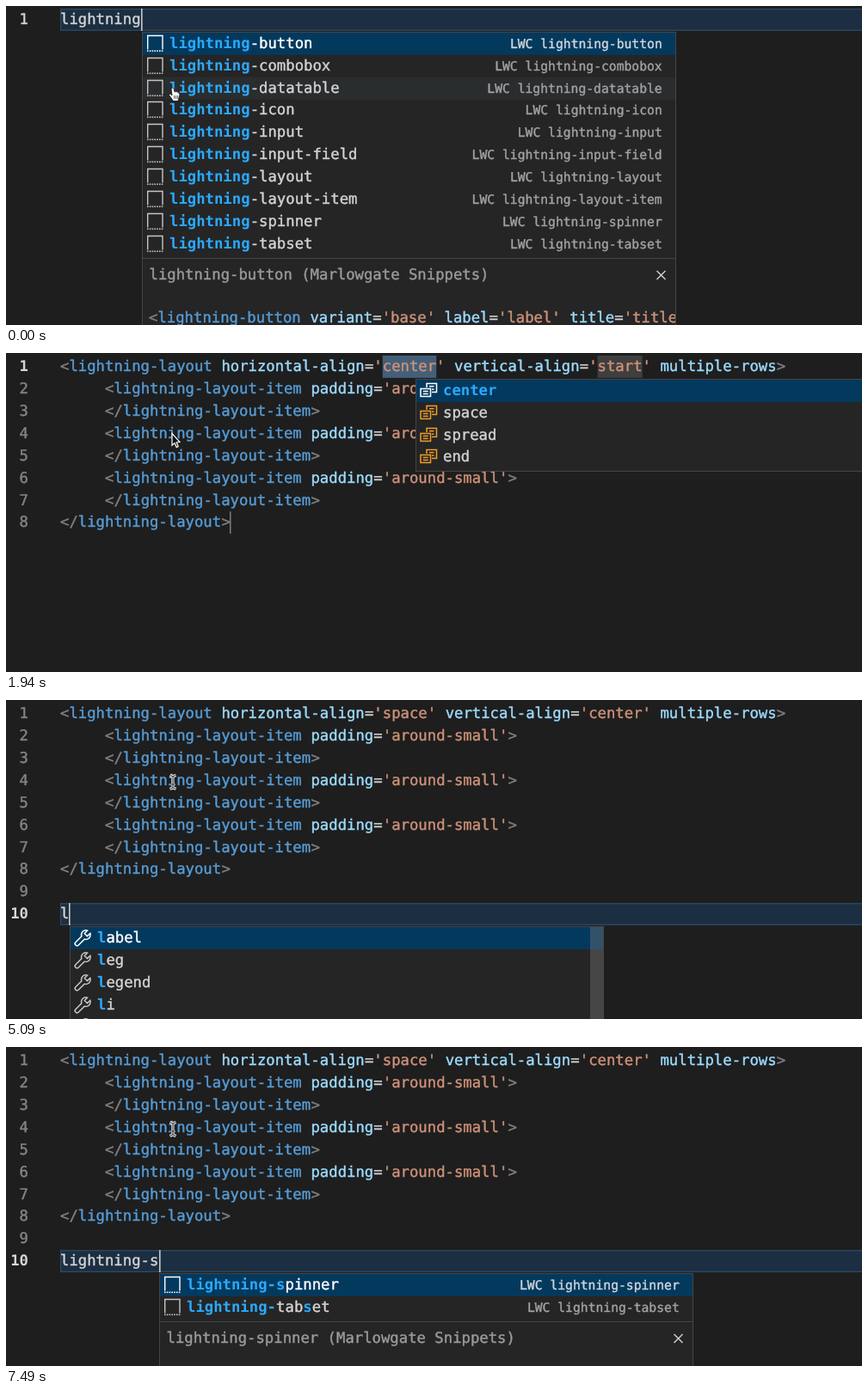
Animation of 995 by 371 pixels, one loop 8000 ms. Source, as an HTML page with a canvas:

```html
<!DOCTYPE html>
<html lang="en">
<head>
<meta charset="utf-8">
<title>Snippet completion</title>
<style>
html, body { margin: 0; width: 100%; height: 100%; overflow: hidden; background: #1e1e1e; }
canvas { display: block; width: 995px; height: 371px; }
</style>
</head>
<body>
<canvas id="stage"></canvas>
<script>
const W = 995, H = 371, LOOP = 8000;
const LEFT = 63, TOP = 3, ROW = 25.9, SIZE = 17.28, ADV = 10.41;
const MENU_W = 621, MENU_PAD = 3.6;
const C = {
  bg: '#1e1e1e', panel: '#252526', edge: '#454545', text: '#d4d4d4', picked: '#04395e',
  hover: '#2a2d2e', match: '#2aaaff', tag: '#569cd6', bracket: '#808080', attr: '#9cdcfe',
  string: '#ce9178', dim: '#858585', orange: '#ee9d28', line: '#1c2e42', lineEdge: '#2d4a63'
};

const canvas = document.getElementById('stage');
const ctx = canvas.getContext('2d');
const dpr = window.devicePixelRatio || 1;
canvas.width = W * dpr;
canvas.height = H * dpr;
ctx.scale(dpr, dpr);
ctx.textRendering = 'geometricPrecision';

const component = name => ({ label: 'lightning-' + name, detail: 'LWC lightning-' + name, icon: snippetIcon });
const components = ['button', 'combobox', 'datatable', 'icon', 'input', 'input-field',
  'layout', 'layout-item', 'spinner', 'tabset'].map(component);
const keyword = label => ({ label, icon: wrenchIcon });
const choice = label => ({ label, icon: enumIcon });
const alignX = ['center', 'space', 'spread', 'end'].map(choice);
const alignY = ['start', 'center', 'end', 'stretch'].map(choice);

// Each step changes part of the state from its time on.
const steps = [
  [0, { typed: 'lightning', line: 0, caret: true, mouse: handCursor, field: -1, pick: 0, sash: 0 }],
  [150, { typed: 'lightning-' }],
  [450, { typed: 'lightning-l' }],
  [600, { typed: 'lightning-la', mouse: arrowCursor }],
  [750, { typed: 'lightning-lay', mouse: resizeCursor }],
  [1040, { sash: 0.5 }],
  [1190, { sash: 1, caret: false }],
  [1340, { typed: '', inserted: true, h: 'center', v: 'start', field: 0, sash: 0, caret: true, mouse: arrowCursor }],
  [1490, { choices: alignX }],
  [1940, { caret: false }],
  [2240, { pick: 1 }],
  [2390, { caret: true }],
  [2690, { h: 'space', field: 1, choices: alignY, pick: 0 }],
  [3290, { pick: 1, caret: false }],
  [3590, { v: 'center', field: -1, choices: null, pick: 0, line: 7, caret: true, mouse: beamCursor }],
  [4190, { caret: false }],
  [4640, { line: 8, caret: true }],
  [4790, { line: 9 }],
  [5090, { typed: 'l' }],
  [5240, { typed: 'li' }],
  [5540, { typed: 'lig' }],
  [5690, { typed: 'ligh' }],
  [6290, { caret: false }],
  [6440, { typed: 'lightn', caret: true }],
  [6740, { typed: 'lightni' }],
  [6890, { typed: 'lightnin' }],
  [7040, { typed: 'lightning' }],
  [7340, { typed: 'lightning-' }],
  [7490, { typed: 'lightning-s' }]
];

const stateAt = t => Object.assign({}, ...steps.filter(s => s[0] <= t).map(s => s[1]));

function layoutCode(h, v, indent) {
  const pad = ' '.repeat(indent);
  const item = [pad + "<lightning-layout-item padding='around-small'>", pad + '</lightning-layout-item>'];
  return [`<lightning-layout horizontal-align='${h}' vertical-align='${v}' multiple-rows>`,
    ...item, ...item, ...item, '</lightning-layout>'];
}

function docCode(label) {
  if (label === 'lightning-layout') return layoutCode('center', 'start', 4);
  return ["<lightning-button variant='base' label='label' title='title'>", '</lightning-button>'];
}

function rect(x, y, w, h, color) {
  ctx.fillStyle = color;
  ctx.fillRect(x, y, w, h);
}

// Regular text gets a hairline outline for a slightly heavier weight.
function text(str, x, mid, color, bold = false, size = SIZE) {
  const base = Math.floor(mid) + 6;
  ctx.font = `${bold ? 'bold ' : ''}${size}px "DejaVu Sans Mono", monospace`;
  ctx.fillStyle = color;
  ctx.fillText(str, x, base);
  if (!bold) {
    ctx.strokeStyle = color;
    ctx.lineWidth = 0.4;
    ctx.strokeText(str, x, base);
  }
  return x + str.length * ADV * size / SIZE;
}

function textRight(str, right, mid, color, bold, size = SIZE) {
  text(str, right - str.length * ADV * size / SIZE, mid, color, bold, size);
}

function code(str, x, mid) {
  let prev = '';
  for (const m of str.matchAll(/<\/?|>|=|'[^']*'|[\w-]+/g)) {
    const s = m[0];
    const color = /^[<>]/.test(s) ? C.bracket : s === '=' ? C.text : s[0] === "'" ? C.string
      : prev[0] === '<' ? C.tag : C.attr;
    text(s, x + m.index * ADV, mid, color);
    prev = s;
  }
}

const lineTop = i => TOP + i * ROW;
const lineMid = i => lineTop(i) + 12.65;
const colX = n => LEFT + n * ADV;

// Positions in label that match the query in order, or null.
function matchSpots(label, query) {
  const spots = [];
  let from = 0;
  for (const ch of query) {
    const i = label.indexOf(ch, from);
    if (i < 0) return null;
    spots.push(i);
    from = i + 1;
  }
  return spots;
}

function suggestions(typed) {
  if (typed === 'l') return ['label', 'leg', 'legend', 'li', 'link'].map(keyword);
  if (typed === 'li') return ['li', 'link'].map(keyword).concat(components);
  const last = item => matchSpots(item.label, typed).at(-1);
  return components.filter(c => matchSpots(c.label, typed)).sort((a, b) => last(a) - last(b));
}

function stroke(color, width, draw) {
  ctx.strokeStyle = color;
  ctx.lineWidth = width;
  ctx.beginPath();
  draw();
  ctx.stroke();
}

function poly(points, close) {
  points.forEach(([x, y], i) => i ? ctx.lineTo(x, y) : ctx.moveTo(x, y));
  if (close) ctx.closePath();
}

function snippetIcon(x, mid, picked) {
  const color = picked ? '#fff' : '#c5c5c5', y = mid - 8.5;
  stroke(color, 1.4, () => poly([[x + 0.7, y + 16], [x + 0.7, y], [x + 18, y], [x + 18, y + 16]]));
  for (let i = 0; i < 7; i++) rect(x + i * 2.8, y + 17, 1.6, 1.6, color);
}

function enumIcon(x, mid, picked) {
  const color = picked ? '#fff' : C.orange;
  stroke(color, 1.5, () => {
    poly([[x + 7, mid - 3], [x + 7, mid - 7.5], [x + 18.5, mid - 7.5], [x + 18.5, mid + 2.5], [x + 13, mid + 2.5]]);
    ctx.rect(x, mid - 1.5, 11.5, 9);
    poly([[x + 10, mid - 4.2], [x + 15.5, mid - 4.2]]);
    poly([[x + 13, mid - 0.8], [x + 15.5, mid - 0.8]]);
    poly([[x + 2.8, mid + 1.6], [x + 8.7, mid + 1.6]]);
    poly([[x + 2.8, mid + 4.6], [x + 8.7, mid + 4.6]]);
  });
}

function wrenchIcon(x, mid, picked) {
  ctx.save();
  ctx.translate(x + 9, mid + 1);
  ctx.rotate(-Math.PI / 4);
  stroke(picked ? '#fff' : '#c5c5c5', 1.5, () => {
    ctx.arc(-9, 0, 2.4, Math.PI / 2, -Math.PI / 2);
    ctx.arc(5.5, 0, 5.3, -2.67, -0.45);
    ctx.lineTo(5.5, -2.2);
    ctx.lineTo(5.5, 2.2);
    ctx.arc(5.5, 0, 5.3, 0.45, 2.67);
    ctx.closePath();
  });
  ctx.restore();
}

function drawLabel(item, query, x, mid, picked) {
  const spots = matchSpots(item.label, query) || [];
  const runs = [];
  [...item.label].forEach((ch, i) => {
    const hit = spots.includes(i);
    const run = runs.at(-1);
    if (run && run.hit === hit) run.s += ch;
    else runs.push({ s: ch, hit });
  });
  for (const { s, hit } of runs) x = text(s, x, mid, hit ? C.match : picked ? '#fff' : C.text, hit);
}

function drawMenu(items, query, x, line, pick, hover, width) {
  const top = lineTop(line) + 27, y = Math.round(top);
  const rows = Math.min(items.length, 12);
  const bottom = Math.round(top + rows * ROW + MENU_PAD);
  rect(x, y, width, bottom - y + 1, C.edge);
  rect(x + 1, y + 1, width - 2, bottom - y - 1, C.panel);
  items.slice(0, rows).forEach((item, i) => {
    const picked = i === pick, mid = Math.floor(lineMid(line) + 27.6 + i * ROW);
    if (picked || i === hover) rect(x + 1, y + 1 + i * ROW, width - 2, ROW, picked ? C.picked : C.hover);
    item.icon(x + 6, mid, picked);
    drawLabel(item, query, x + 32, mid, picked);
    if (item.detail) textRight(item.detail, x + 605, mid, picked ? '#cfd6dc' : '#a2a2a2', false, 14.7);
  });
  if (query.length && query.length < 3) rect(x + width - 16, y + 1, 15, bottom - y - 1, 'rgba(121,121,121,0.4)');
  return bottom;
}

function drawDoc(label, x, y) {
  const lines = docCode(label);
  const h = Math.round(64 + lines.length * ROW);
  rect(x, y, MENU_W, h, C.edge);
  rect(x + 1, y + 1, MENU_W - 2, h - 2, C.panel);
  text(label + ' (Marlowgate Snippets)', x + 8.5, y + 19, '#9b9b9b');
  const cx = x + 603.5, cy = y + 20;
  stroke('#cccccc', 1.5, () => {
    poly([[cx - 5, cy - 5], [cx + 5, cy + 5]]);
    poly([[cx + 5, cy - 5], [cx - 5, cy + 5]]);
  });
  ctx.save();
  ctx.beginPath();
  ctx.rect(x, y, MENU_W - 1, h);
  ctx.clip();
  lines.forEach((s, i) => code(s, x + 8, y + 69 + i * ROW));
  ctx.restore();
  return h;
}

function drawSuggestions(s) {
  const x = Math.floor(colX(s.typed.length) + 1.35);
  const items = suggestions(s.typed);
  const hover = s.mouse === handCursor ? 2 : -1;
  const bottom = drawMenu(items, s.typed, x, s.line, 0, hover, MENU_W);
  if (items[0].detail) {
    const h = drawDoc(items[0].label, x, bottom);
    if (s.sash) {
      ctx.globalAlpha = s.sash;
      rect(x - 4, bottom + 1, 5.5, h - 3, '#0078d4');
      ctx.globalAlpha = 1;
    }
  }
}

function shape(points, fill, edge, width) {
  ctx.beginPath();
  poly(points, true);
  ctx.fillStyle = fill;
  ctx.fill();
  stroke(edge, width, () => poly(points, true));
}

function arrowCursor() {
  shape([[193, 93.5], [193, 107.5], [196, 104.8], [198.2, 109.6], [200.2, 108.7],
    [198.2, 104], [202, 103.6]], '#111', '#fff', 1.2);
}

function handCursor() {
  shape([[192, 96], [193.5, 95], [195, 96.5], [196, 100], [198, 99.5], [201, 101], [202, 103],
    [201, 107], [200, 110.5], [194.5, 110.5], [192, 107], [189.5, 103.5], [190.5, 102], [193, 104]],
    '#fff', '#111', 0.8);
  stroke('#333', 0.8, () => [195.6, 197.6, 199.6].forEach(x => poly([[x, 104], [x, 108]])));
}

function beamCursor() {
  const draw = () => {
    poly([[190.5, 87.5], [194, 89], [197.5, 87.5]]);
    poly([[194, 89], [194, 102]]);
    poly([[190.5, 103.5], [194, 102], [197.5, 103.5]]);
    poly([[192, 98], [196, 98]]);
  };
  stroke('#eee', 3, draw);
  stroke('#222', 1, draw);
}

function resizeCursor() {
  const draw = () => {
    poly([[187, 95], [199, 95]]);
    poly([[189.5, 92.5], [187, 95], [189.5, 97.5]]);
    poly([[196.5, 92.5], [199, 95], [196.5, 97.5]]);
    poly([[193, 89], [193, 101]]);
  };
  stroke('#fff', 3.6, draw);
  stroke('#111', 1.6, draw);
}

function drawFields(s) {
  const hCol = 36, vCol = hCol + s.h.length + 18;
  [[hCol, s.h], [vCol, s.v]].forEach(([col, word], i) => {
    const box = [colX(col), TOP, word.length * ADV, ROW];
    if (i === s.field) rect(...box, '#264f78');
    rect(...box, 'rgba(124,124,124,0.35)');
  });
  rect(260, lineTop(7), 1.5, ROW, '#7c7c7c');
  return s.field ? vCol + s.v.length : hCol + s.h.length;
}

function draw(t) {
  const s = stateAt(t);
  rect(0, 0, W, H, C.bg);
  const lines = s.inserted ? layoutCode(s.h, s.v, 5) : [];
  const count = Math.max(lines.length, s.line + 1);
  let caretCol = s.line === 7 ? 19 : s.typed.length;

  if (s.field < 0) {
    const y = lineTop(s.line);
    rect(LEFT, y, W - LEFT, ROW, C.lineEdge);
    rect(LEFT + 1.3, y + 1.3, W - LEFT, ROW - 2.6, C.line);
  } else {
    caretCol = drawFields(s);
  }
  for (let i = 0; i < count; i++) {
    const active = i === s.line;
    textRight(String(i + 1), 26, lineMid(i), active ? '#d6d6d6' : C.dim, active && s.inserted);
    if (lines[i]) code(lines[i], LEFT, lineMid(i));
  }
  text(s.typed, LEFT, lineMid(s.line), C.text);
  if (s.caret) rect(Math.round(colX(caretCol)), lineTop(s.line), 1.6, ROW, '#c8c8c8');

  if (s.typed) drawSuggestions(s);
  if (s.choices) drawMenu(s.choices, s.field && s.pick === 0 ? s.v : s.choices[s.pick].label, 476, 0, s.pick, -1, 640);
  s.mouse();
}

function tick(now) {
  draw(now % LOOP);
  requestAnimationFrame(tick);
}
requestAnimationFrame(tick);
</script>
</body>
</html>
```
